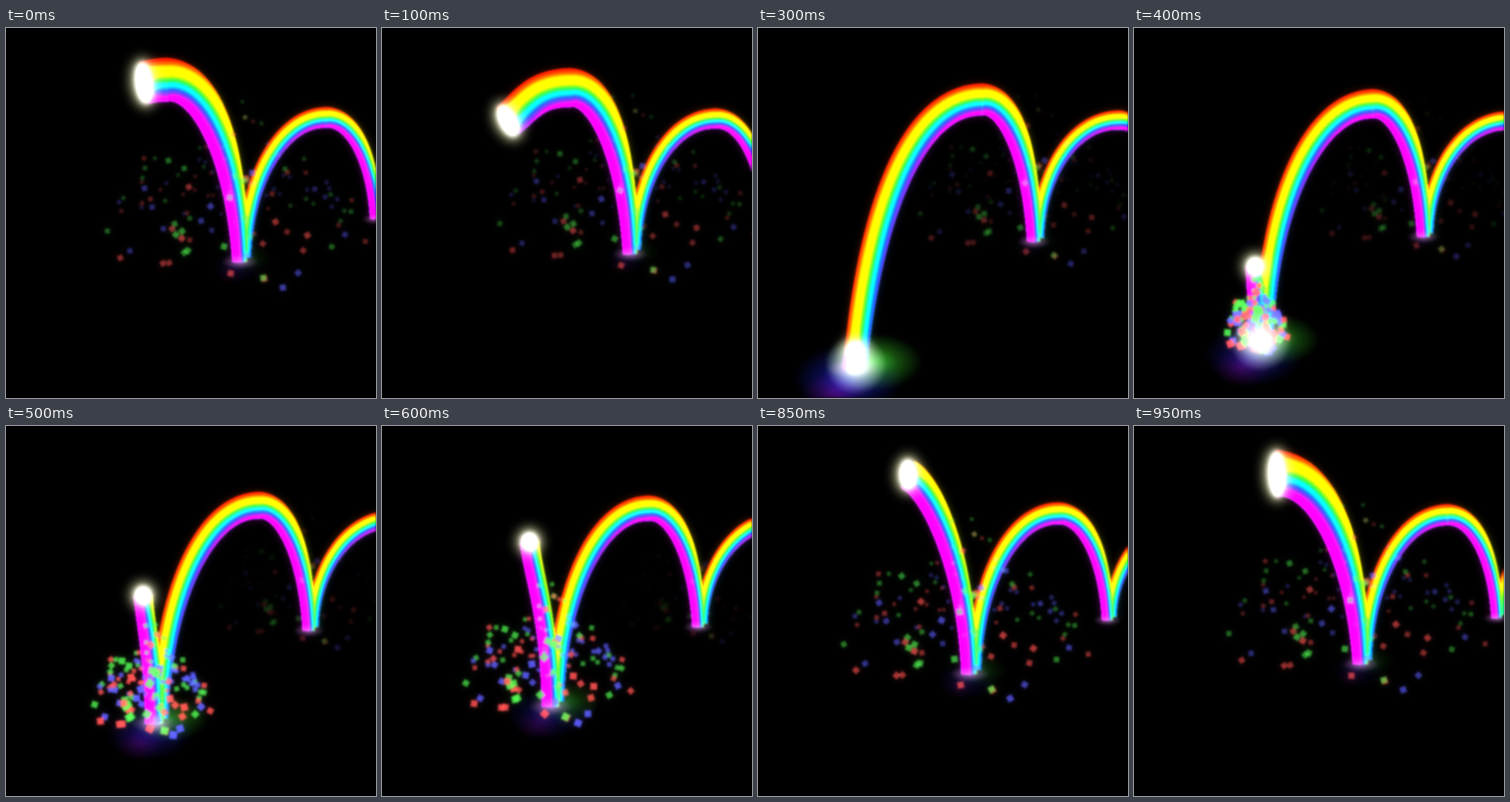
Write an HTML page with a canvas that moves like this. It is 540 by 540 pixels and loops after 1000 ms.

```html
<!DOCTYPE html>
<html lang="en">
<head>
<meta charset="utf-8">
<title>Rainbow bounce</title>
<style>
html, body { margin: 0; width: 100%; height: 100%; overflow: hidden; background: #000; }
canvas { display: block; width: 100vw; height: 100vh; }
</style>
</head>
<body>
<canvas id="stage" width="540" height="540"></canvas>
<script>
const SIZE = 540, LOOP = 1000, STEP = 50, LANDING = 300;
const APEX = .65; // age of a bounce, in loops, at which the ball is highest
const RAINBOW = ['#ff1400', '#ff4800', '#ffb000', '#fff000', '#fff000', '#96ff00',
  '#20ff30', '#00ffc0', '#00a8ff', '#2040ff', '#7a20ff', '#ff00ff'];
const INKS = ['#ff5050', '#48dc48', '#5c5cff'];

const out = document.getElementById('stage').getContext('2d');
const layer = document.createElement('canvas');
layer.width = layer.height = SIZE;
const ctx = layer.getContext('2d');

const { exp, min, max, sin, cos, PI } = Math;
const clamp = v => max(0, min(1, v));
const mix = (a, b, k) => a + (b - a) * k;

// All positions depend on the age of a bounce, counted in loops.
const foot = a => [211 + 193 * a - 72 * exp(-3.8 * a), 262 + 235 * exp(-1.55 * a)];
const footWidth = a => 9 + 20 * exp(-.7 * a);

function ball(a) {
  const d = a - .6, pull = d < 0 ? 1120 : 750 + 4700 * d;
  return [142 + 81 * sin(PI * a ** .85), 68 + pull * d * d];
}
const ballWidth = a => a < APEX ? 27 + 41 * (a / APEX) ** 5 : 68 * exp(-2 * (a - APEX));

function peak(a) {
  const d = a - APEX;
  return d < 0 ? ball(a) : [136 + 195 * a - 56 * exp(-8 * d), 139 - 70 * exp(-2 * d)];
}
const peakWidth = a => a < APEX ? ballWidth(a) : 25 + 43 * exp(-2 * (a - APEX));

let seed = 7;
const rnd = () => (seed = seed * 16807 % 2147483647) / 2147483647;

// sparks fly out over the floor; those near the middle rise higher
const sparks = Array.from({ length: 130 }, () => {
  const turn = rnd() * 2 * PI, r = rnd() ** .6, near = (1 + sin(turn)) / 2;
  return {
    x: cos(turn) * r * 220 - 15,
    y: sin(turn) * r * 85 - 20 - rnd() * (1.1 - r) * 260,
    ink: INKS[Math.floor(rnd() * 3)],
    size: mix(.65, 1.15, near),
    fade: mix(2.4, .8, near),
    turn
  };
});

function blob(x, y, rx, ry, rgb, alpha) {
  const g = ctx.createRadialGradient(0, 0, 0, 0, 0, 1);
  g.addColorStop(0, `rgba(${rgb},${alpha})`);
  g.addColorStop(.5, `rgba(${rgb},${alpha * .4})`);
  g.addColorStop(1, `rgba(${rgb},0)`);
  ctx.save();
  ctx.translate(x, y);
  ctx.scale(rx, ry);
  ctx.fillStyle = g;
  ctx.fillRect(-1, -1, 2, 2);
  ctx.restore();
}

function drawFloor(a) {
  const [x, y] = foot(a), s = 2 + 14 * exp(-1.3 * a), glow = .65 * exp(-2.3 * a);
  blob(x - 1.6 * s, y + 2.2 * s, 3 * s, 2 * s, '190,0,150', glow * .5);
  blob(x - .5 * s, y + s, 5 * s, 3.2 * s, '30,40,255', glow * .8);
  blob(x + 1.8 * s, y - .6 * s, 4.5 * s, 2.6 * s, '60,220,40', glow);
}

// samples a cubic; both ends are [width, first hue, last hue]
function cubic(a, b, c, d, from, to) {
  const pts = [];
  for (let i = 0; i <= 30; i++) {
    const u = i / 30, v = 1 - u;
    const pos = j => v * v * v * a[j] + 3 * v * v * u * b[j] + 3 * v * u * u * c[j] + u * u * u * d[j];
    const dir = j => v * v * (b[j] - a[j]) + 2 * v * u * (c[j] - b[j]) + u * u * (d[j] - c[j]);
    const dx = dir(0), dy = dir(1), len = Math.hypot(dx, dy);
    if (len < .01) continue;
    const [w, lo, hi] = from.map((f, j) => mix(f, to[j], u));
    pts.push({ x: pos(0), y: pos(1), nx: -dy / len, ny: dx / len, w, lo, hi });
  }
  return pts;
}

function drawRibbon(pts) {
  const edge = (p, o) => [p.x + p.nx * p.w * (.5 - o), p.y + p.ny * p.w * (.5 - o)];
  const inner = pts.map(p => edge(p, 1)).reverse();
  RAINBOW.forEach((ink, i) => {
    const hue = i / RAINBOW.length;
    const outer = pts.map(p => edge(p, clamp((hue - p.lo) / (p.hi - p.lo))));
    ctx.beginPath();
    for (const q of outer.concat(inner)) ctx.lineTo(...q);
    ctx.fillStyle = ink;
    ctx.fill();
  });
}

function drawArch(a) {
  const f = foot(a), p = peak(a), fw = footWidth(a), pw = peakWidth(a);
  const bend = clamp((a - .3) / .35), roll = clamp((a - .45) / .2);
  const top = [pw, .32 * (1 - roll), 1.35 - .3 * roll];

  if (a > APEX) {
    let end = ball(a), w = ballWidth(a);
    if (a > 1) {
      const nw = footWidth(a - 1), [x, y] = foot(a - 1);
      end = [x + .35 * nw, y - .3 * nw];
      w = .6 * pw;
    }
    const dx = p[0] - end[0], dy = end[1] - p[1];
    const fall = clamp((a - .7) / .2), lean = .3 * clamp((1.05 - a) / .15);
    drawRibbon(cubic(p, [p[0] - dx * mix(.5, .6, fall), p[1]],
      [end[0] + dx * lean, end[1] - dy * .5], end,
      top, [w, .06 * fall, 1.05 - .25 * fall]));
  }
  const dx = f[0] - p[0], dy = f[1] - p[1];
  drawRibbon(cubic(f, [f[0] - .02 * dx, f[1] - .53 * dy],
    [p[0] + mix(.2, .6, bend * bend) * dx, p[1] + .22 * (1 - bend) * dy], p,
    [fw, .5, 1.45], top));
  blob(f[0], f[1], fw * 1.3, fw * .5, '255,150,255', .5);
}

function drawBall(a) {
  const [x, y] = ball(a), ry = max(14, ballWidth(a) / 2), turn = -12 * max(0, a - .6) ** 2;
  const oval = (grow, blur, ink) => {
    ctx.filter = `blur(${blur}px)`;
    ctx.fillStyle = ink;
    ctx.beginPath();
    ctx.ellipse(x, y, 13 + grow, ry + grow, turn, 0, 2 * PI);
    ctx.fill();
  };
  oval(6, 8, 'rgba(255,255,190,.55)');
  oval(0, 3, '#fff');
  ctx.filter = 'none';
}

function drawSparks(a) {
  const [fx, fy] = foot(a), spread = 2.2 * a * exp(-a * a), lift = spread ** .6;
  for (const s of sparks) {
    const d = s.size * (6 + 5 * exp(-1.5 * a));
    ctx.save();
    ctx.translate(fx + s.x * spread, fy + s.y * (s.y < 0 ? lift : spread));
    ctx.rotate(s.turn + 2.5 * a);
    ctx.globalAlpha = clamp(1 - a / 1.4) ** s.fade;
    ctx.fillStyle = s.ink;
    ctx.fillRect(-d / 2, -d / 2, d, d);
    ctx.restore();
  }
}

function drawSplash(a) {
  const [x, y] = foot(a), k = min(1, exp(12 * (.1 - a)));
  blob(x + 4, y - 6 * k, 15 + 30 * k, 10 + 34 * k, '255,255,255', k);
}

function render(t) {
  const ages = [3, 2, 1, 0].map(j => (t - LANDING) / LOOP + j).filter(a => a >= 0);
  const young = ages[ages.length - 1];
  ctx.clearRect(0, 0, SIZE, SIZE);
  ages.forEach(drawFloor);
  blob(125, 535, 135, 90, '90,25,0', .25 * clamp((young - .8) * 10));
  ages.forEach(drawArch);
  drawBall(young);
  ages.forEach(drawSparks);
  drawSplash(young);

  out.fillStyle = '#000';
  out.fillRect(0, 0, SIZE, SIZE);
  out.filter = 'blur(1.4px)';
  out.drawImage(layer, 0, 0);
  out.globalCompositeOperation = 'lighter';
  out.globalAlpha = .35;
  out.filter = 'blur(6px)';
  out.drawImage(layer, 0, 0);
  out.globalCompositeOperation = 'source-over';
  out.globalAlpha = 1;
  out.filter = 'none';
}

let shown = -1;
function tick(now) {
  const t = Math.floor(now % LOOP / STEP) * STEP;
  if (t !== shown) render(shown = t);
  requestAnimationFrame(tick);
}
requestAnimationFrame(tick);
</script>
</body>
</html>
```
